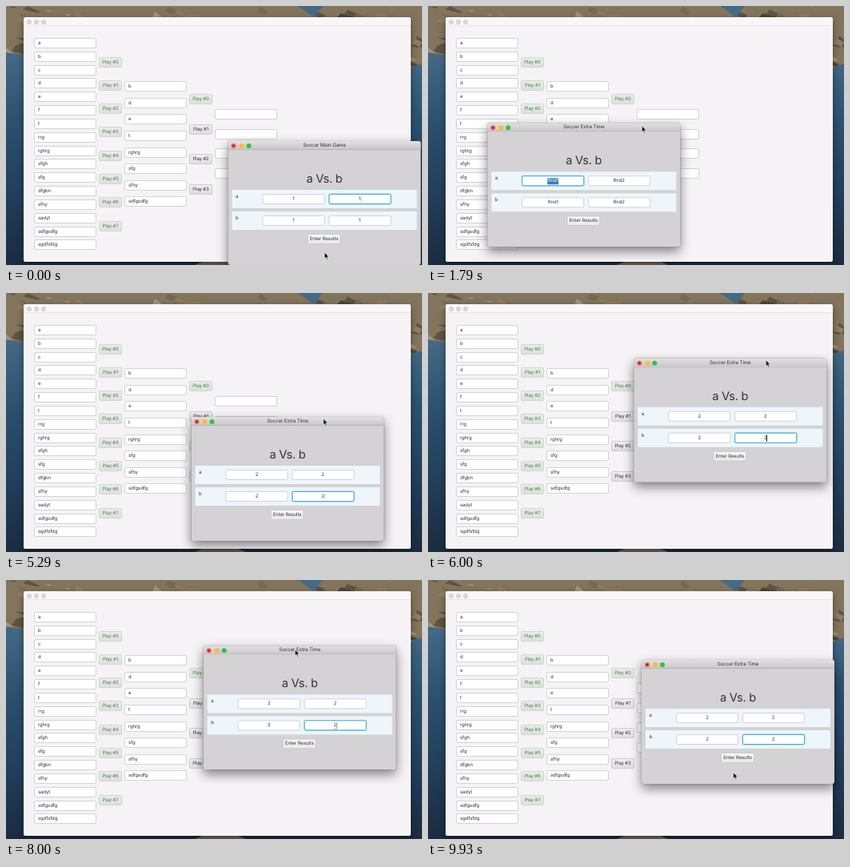
Animation of 520x324 px, one loop 10 s. Source, as an HTML page:

```html
<!DOCTYPE html>
<html lang="en">
<head>
<meta charset="utf-8">
<title>Soccer bracket</title>
<style>
html, body { margin: 0; width: 100%; height: 100%; overflow: hidden; }
#stage { position: relative; width: 520px; height: 324px; overflow: hidden;
  font: 6px/12px Inter, "Open Sans", sans-serif; letter-spacing: -.12px; color: #333;
  text-rendering: geometricPrecision; }
#stage div, #stage svg { position: absolute; left: 0; top: 0; box-sizing: border-box; white-space: pre; }
#stage #main { left: 22px; top: 14px; width: 484px; height: 306px; border-radius: 3px 3px 2px 2px;
  background: #f5f3f6; box-shadow: 0 3px 8px rgba(0,0,0,.4); }
.bar { width: 100%; height: 11px; border-radius: 3px 3px 0 0; }
#main .bar { background: #f8f6f8; border-bottom: .5px solid #e8e6e9; }
.dot { width: 6px; height: 6px; border-radius: 50%; }
#main .dot { background: #dcdadd; border: .5px solid #cbc9cc; }
.field { width: 78px; height: 13px; background: #fff; border: 1px solid #d3d2d5; border-radius: 2px;
  line-height: 11px; padding-left: 4px; }
.btn { height: 13px; border: 1px solid #cccbcd; border-radius: 2px; text-align: center; line-height: 11px;
  background: linear-gradient(#f0eff0, #dfdee0); }
.done { color: #3a8a3a; background: linear-gradient(#eaecea, #dde0dc); border-color: #d3d5d2; }
#dialog { width: 241px; height: 155px; border-radius: 3px; background: #d4d2d4;
  box-shadow: 0 0 1px rgba(0,0,0,.5), 0 6px 14px rgba(0,0,0,.48); }
#dialog .bar { border-bottom: .5px solid #b5b3b5; background: linear-gradient(#e2e0e2, #cac8ca); }
#title { width: 100%; text-align: center; line-height: 11px; font-size: 6.2px; }
#stage #teams { top: 37px; width: 100%; text-align: center; font-size: 14.6px; line-height: 20px;
  letter-spacing: -.25px; }
#stage .row { left: 5px; width: 231px; height: 23px; background: #eef5fb; }
#dialog .field { padding: 0; text-align: center; }
#dialog .btn { background: linear-gradient(#f8f8f8, #e9e9e9); }
#dialog .focus { border-color: #45abd2; box-shadow: 0 0 0 .4px #8fd0ea; }
.field span { display: inline-block; line-height: 8px; }
.selected span { background: #3a7db0; color: #fff; }
.caret span { box-shadow: .7px 0 #111; }
#stage #cursor { left: -1px; top: -1px; }
</style>
</head>
<body>
<div id="stage">
  <svg width="520" height="324">
    <defs>
      <linearGradient id="sea" x2="0" y2="1">
        <stop offset=".18" stop-color="#456a86"/><stop offset=".45" stop-color="#2c5070"/>
        <stop offset=".75" stop-color="#213d59"/><stop offset="1" stop-color="#1a2c40"/>
      </linearGradient>
      <clipPath id="land"><path d="M0 0H365L385 14L396 0H520V72L500 80L24 62L0 58Z"/></clipPath>
    </defs>
    <rect width="520" height="324" fill="url(#sea)"/>
    <g id="rocks" clip-path="url(#land)"><rect width="520" height="90" fill="#83745c"/></g>
    <path d="M236 324L250 318H286L300 324Z" fill="#6f6253"/>
  </svg>
  <div id="main"><div class="bar"></div></div>
  <div id="dialog">
    <div class="bar"></div>
    <div id="title"></div>
    <div id="teams">a Vs. b</div>
  </div>
  <svg id="cursor" width="10" height="13" viewBox="-1 -1 10 13">
    <path d="M0 0V8.2L1.9 6.5L3.2 9.4L4.6 8.8L3.3 6H5.9Z" fill="#111" stroke="#fff" stroke-width=".7"/>
  </svg>
</div>
<script>
const $ = id => document.getElementById(id);
const main = $('main'), dialog = $('dialog'), cursor = $('cursor'), title = $('title');

// Seeded patches of light and shade on the cliffs
let seed = 7;
const random = () => (seed = seed * 16807 % 2147483647) / 2147483647;
const shades = ['#5d5443', '#a39479', '#4b493c', '#8f7d61', '#75694f'];
for (let i = 0; i < 160; i++) {
  const patch = document.createElementNS('http://www.w3.org/2000/svg', 'path');
  const x = random() * 520, y = random() * 85, w = 5 + random() * 14;
  patch.setAttribute('d', `M${x} ${y}l${w} ${random() * 9}l${-w / 3} ${random() * 7}l${-w} -4Z`);
  patch.setAttribute('fill', shades[i % shades.length]);
  $('rocks').append(patch);
}

function add(parent, cls, x, y, text = '', w) {
  const el = document.createElement('div');
  el.className = cls;
  el.textContent = text;
  el.style.cssText = `left:${x}px;top:${y}px;` + (w ? `width:${w}px` : '');
  parent.append(el);
  return el;
}

// Bracket: x and vertical centre are stage coordinates
const onMain = (cls, x, y, text, w) => add(main, cls, x - 22, y - 20.5, text, w);
const column = (names, x, y, step) =>
  names.split(' ').forEach((name, i) => onMain('field', x, y + i * step, name));
column('a b c d e f t rrg rghrg sfgh sfg dfgbn sfhy sadyt sdfgsdfg sgdfsfdg', 35, 46.4, 16.83);
column('b d e t rghrg sfg sfhy sdfgsdfg', 148, 100.4, 20.65);
column('   ', 261, 135.6, 24.6);
for (let i = 0; i < 8; i++) onMain('btn done', 116, 70 + i * 29.3, 'Play #' + i, 29);
for (let i = 0; i < 4; i++) onMain(i ? 'btn' : 'btn done', 229, 116.8 + i * 37.4, 'Play #' + i, 29);
for (let i = 0; i < 3; i++) add(main, 'dot', 4 + i * 9, 2.5);

// Dialog
['radial-gradient(#8c2320 18%, #fb5b55 40%)', '#fdbc2e', '#2fc440']
  .forEach((color, i) => add(dialog, 'dot', 4 + i * 9.5, 2.6).style.background = color);
const fields = [];
['a', 'b'].forEach((team, i) => {
  const y = 61 + i * 27;
  add(dialog, 'row', 5, y);
  add(dialog, '', 9.5, y + 2.5, team);
  for (const x of [43, 125.5]) {
    const el = add(dialog, 'field', x, y + 4.5);
    fields.push({ el, text: el.appendChild(document.createElement('span')) });
  }
});
add(dialog, 'btn', 99, 116, 'Enter Results', 42);

// Times are ticks of 1/14 s, 140 per loop
const OPEN = 6;
const mix = (a, b, p) => a.map((v, i) => v + (b[i] - v) * p);

// Each drag swings out by `swing`, furthest at share `peak` of its time
const drags = [
  { start: 21, end: 36, to: [231.5, 155], grip: [193, 3.5], swing: [-191, -19], peak: .27 },
  { start: 75, end: 99, to: [222, 60], grip: [165, 2], swing: [53, -68], peak: .667 },
  { start: 105, end: 133, to: [267, 100], grip: [114.5, 4.5], swing: [19, 17.5], peak: .5 }
];

function windowAt(t) {
  let at = [277.5, 169];
  for (const { start, end, to, swing, peak } of drags) {
    const p = Math.min(1, Math.max(0, (t - start) / (end - start)));
    const out = Math.sin(Math.PI * p ** (Math.log(.5) / Math.log(peak)));
    at = mix(at, to, p).map((v, i) => v + swing[i] * out);
  }
  return at;
}

const held = (drag, t) => windowAt(t).map((v, i) => v + drag.grip[i]);
const [first, second, third] = drags;
const stops = [
  [0, [398, 308]], [4, [398, 290]], [8, held(first, first.start)],
  [first.end, held(first, first.end)], [40, [421, 188]], [64, [421, 188]],
  [72, held(second, second.start)], [second.end, held(second, second.end)],
  [102, held(third, third.start)], [third.end, held(third, third.end)], [139, [381.5, 240.5]]
];

function pointerAt(t) {
  const drag = drags.find(d => t >= d.start && t <= d.end);
  if (drag) return held(drag, t);
  const i = stops.findIndex(s => s[0] >= t);
  if (i === 0) return stops[0][1];
  const [t0, from] = stops[i - 1], [t1, to] = stops[i];
  // waits in place while a drag lies ahead in this span
  const next = drags.find(d => d.start > t0 && d.end === t1);
  return next ? from : mix(from, to, (t - t0) / (t1 - t0));
}

const place = (el, [x, y]) => el.style.transform = `translate(${x}px, ${y}px)`;

function draw(t) {
  const extra = t >= OPEN;
  place(dialog, windowAt(t));
  place(cursor, pointerAt(t));
  title.textContent = extra ? 'Soccer Extra Time' : 'Soccer Main Game';

  // Tab to the next field every 4 ticks, type 3 ticks later
  const focus = extra ? Math.min(3, Math.max(0, Math.floor((t - 46) / 4))) : 1;
  fields.forEach(({ el, text }, i) => {
    const typed = !extra || t >= (i ? 49 + 4 * i : 40);
    text.textContent = !extra ? '1' : typed ? '2' : 'Rnd' + (i % 2 + 1);
    const state = !typed ? ' selected' : t % 14 < 9 ? ' caret' : '';
    el.className = 'field' + (i === focus ? ' focus' + state : '');
  });
}

let last = -1;
function frame() {
  const t = Math.floor(performance.now() * .014 + .01) % 140;
  if (t !== last) draw(last = t);
  requestAnimationFrame(frame);
}
frame();
</script>
</body>
</html>
```
